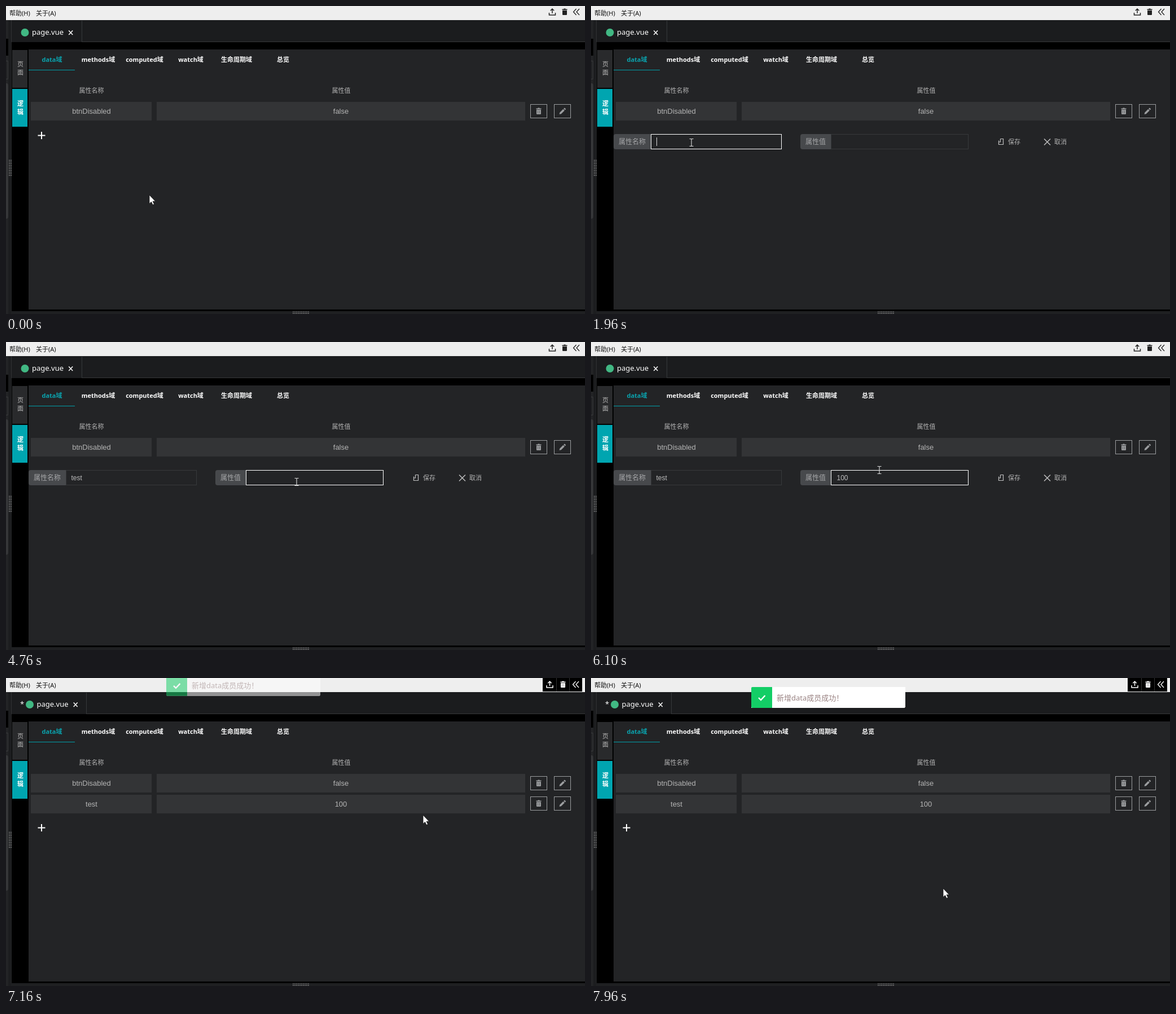
Animation of 1026 by 546 pixels, one loop 8000 ms. Source, as an HTML page:

```html
<!DOCTYPE html>
<html lang="zh-CN">
<head>
<meta charset="utf-8">
<title>page.vue</title>
<style>
html, body { margin: 0; width: 100%; height: 100%; overflow: hidden; background: #000; }
svg { display: block; }
text { font: 11px "Noto Sans", "Noto Sans CJK SC", "Noto Sans CJK", sans-serif; white-space: pre; }
rect { shape-rendering: crispEdges; }
.mid { text-anchor: middle; }
.tab { font-weight: 600; fill: #fff; text-anchor: middle; }
.cell { font: 13px "Liberation Sans", Arial, sans-serif; fill: #b4b4b4; text-anchor: middle; }
.typed { font: 12px "Liberation Sans", Arial, sans-serif; fill: #bcbcbc; }
.label { font-size: 12px; fill: #a6a7a9; }
.soft { fill: #b4b4b4; }
.title { font-size: 13px; fill: #fff; }
.line { fill: none; stroke: currentColor; }
.fill { fill: currentColor; }
</style>
</head>
<body>
<svg width="1026" height="546" viewBox="0 0 1026 546">
  <defs>
    <g id="trash">
      <path class="fill" d="M-4.5-5h3v-1h3v1h3v1.500h-9zM-4-2.700h8v7.200q0 1-1 1h-6q-1 0-1-1z"/>
      <path d="M-1.500-1.200v5M1.500-1.200v5" stroke="#232426" stroke-width=".8" opacity=".6"/>
    </g>
    <path id="pencil" class="fill" d="M-5.500 5.500l.8-3.300 6-6 2.500 2.500-6 6zM2.100-4.600l1-1q.7-.6 1.400 0l1.100 1.100q.6.700 0 1.400l-1 1z"/>
    <path id="upload" class="line" stroke-width="1.500" d="M-5.500 1.500v4h11v-4M0 2.500v-8M-3.200-2.300L0-5.500l3.200 3.200"/>
    <path id="chevrons" class="line" stroke-width="1.300" d="M0-5.500L-5 0l5 5.500M5.500-5.500l-5 5.500 5 5.500"/>
    <g id="actions" color="#9b9d9f">
      <rect class="line" x="929.5" y="174.5" width="29" height="24"/>
      <rect class="line" x="971.5" y="174.5" width="29" height="24"/>
      <use href="#trash" x="944" y="186.500"/>
      <use href="#pencil" x="986" y="186.500"/>
    </g>
    <g id="cells" fill="#333436">
      <rect x="44" y="170" width="214" height="33"/>
      <rect x="267" y="170" width="653" height="33"/>
    </g>
  </defs>

  <rect width="1026" height="546" fill="#000"/>
  <rect y="25" width="10" height="521" fill="#232426"/>
  <rect x="4" y="25" width="5" height="521" fill="#1c1d1f"/>
  <rect y="58" width="4" height="30" fill="#000"/>
  <path d="M0 97.500h3.500v32H0" fill="none" stroke="#38393b"/>
  <path d="M0 137h1q3 0 3 4v232q0 4-3 4H0z" fill="#353638"/>
  <rect x="9" y="25" width="1017" height="39" fill="#1b1c1e"/>
  <rect x="9" y="25" width="1" height="39" fill="#303234"/>
  <rect id="tabLine" y="63" height="1" fill="#36383a"/>
  <rect id="tabEdge" y="26" width="1" height="38" fill="#36383a"/>
  <rect x="40" y="77" width="986" height="461" fill="#232426"/>
  <rect x="9" y="541" width="1017" height="5" fill="#1f2022"/>
  <g id="dots" fill="#a0a0a0"></g>

  <rect width="1026" height="25" fill="#eee"/>
  <text x="6" y="17" fill="#111">帮助(H)</text>
  <text x="53" y="17" fill="#111">关于(A)</text>
  <g id="toolsIdle" color="#222">
    <use href="#upload" x="968" y="10.500"/>
    <use href="#trash" x="990" y="10.500"/>
    <use href="#chevrons" x="1010.500" y="10.500"/>
  </g>
  <g id="toolsDirty" color="#fff">
    <rect x="951" width="70" height="24" fill="#000"/>
    <path d="M975.500 0v24M998.500 0v24" stroke="#333"/>
    <use href="#upload" x="963.500" y="11.500"/>
    <use href="#trash" x="987" y="11.500"/>
    <use href="#chevrons" x="1009.500" y="11.500"/>
  </g>

  <text id="star" class="title" x="25" y="51">*</text>
  <g id="title">
    <circle cx="33.500" cy="47" r="7" fill="#41b883"/>
    <text class="title" x="46" y="51">page.vue</text>
    <path d="M111.200 43.500l7 7.500M118.200 43.500l-7 7.500" stroke="#fff" stroke-width="1.500"/>
  </g>

  <rect x="11" y="78" width="27" height="67" fill="#292a2c"/>
  <rect x="11" y="147" width="27" height="67" fill="#00a5b0"/>
  <g class="mid" fill="#b8b8b8"><text x="25.500" y="107">页</text><text x="25.500" y="122">面</text></g>
  <g class="mid" fill="#fff"><text x="25.500" y="177" font-weight="600" style="font-weight:600">逻</text><text x="25.500" y="192" style="font-weight:600">辑</text></g>

  <text class="tab" x="81.500" y="99" style="fill:#0aa3ae">data域</text>
  <text class="tab" x="163.500" y="99">methods域</text>
  <text class="tab" x="245.500" y="99">computed域</text>
  <text class="tab" x="327.500" y="99">watch域</text>
  <text class="tab" x="408.500" y="99">生命周期域</text>
  <text class="tab" x="491" y="99">总览</text>
  <rect x="40" y="113" width="82" height="1" fill="#00a0aa"/>

  <text class="soft mid" x="151.500" y="154">属性名称</text>
  <text class="soft mid" x="594" y="154">属性值</text>
  <use href="#cells"/>
  <use href="#actions"/>
  <text class="cell" x="151.500" y="191">btnDisabled</text>
  <text class="cell" x="593.500" y="191">false</text>

  <g id="newRow">
    <use href="#cells" y="37"/>
    <use href="#actions" y="36"/>
    <text class="cell" x="151.500" y="227.500">test</text>
    <text class="cell" x="593.500" y="227.500">100</text>
  </g>
  <path id="plus" d="M56.500 229.500h13M63 223v13" stroke="#fff" stroke-width="2"/>

  <g id="form">
    <path d="M44 227h62v27H44q-4 0-4-4v-19q0-4 4-4z" fill="#47494c"/>
    <text class="label" x="49" y="245">属性名称</text>
    <rect id="nameBox" x="106.500" y="227.500" width="231" height="26" fill="none"/>
    <text id="nameText" class="typed" x="115.500" y="245"></text>
    <path d="M375 227h50v27h-50q-4 0-4-4v-19q0-4 4-4z" fill="#47494c"/>
    <text class="label" x="380" y="245">属性值</text>
    <rect id="valueBox" x="425.500" y="227.500" width="243" height="26" fill="none"/>
    <text id="valueText" class="typed" x="435.500" y="245"></text>
    <rect id="caret" y="233" width="1" height="15" fill="#ddd"/>
    <path d="M725.500 235.500h5v10h-8v-7M725.500 235.500v5.500h-3" fill="none" stroke="#c0c0c0" stroke-width="1.200"/>
    <text class="soft" x="739" y="244.500">保存</text>
    <path d="M803 235.500l11 11M814 235.500l-11 11" stroke="#c0c0c0" stroke-width="1.500"/>
    <text class="soft" x="821" y="244.500">取消</text>
  </g>

  <g id="toast">
    <rect x="284" y="16" width="273" height="37" rx="2" fill="#fff"/>
    <path d="M286 16h35v37h-35q-2 0-2-2V18q0-2 2-2z" fill="#13ce66"/>
    <path d="M297 35l4 4 7.500-8" fill="none" stroke="#fff" stroke-width="2.400"/>
    <text x="329" y="39.500" style="font-size:13px" fill="#9a8383">新增data成员成功！</text>
  </g>

  <g id="cursor">
    <path id="arrow" d="M0 0v15.500l3.500-3.300 2.500 5.300 2.600-1.200-2.500-5.100h4.600z" fill="#fff" stroke="#111" stroke-width=".8"/>
    <path id="hand" d="M-2 1.500q0-1.500 1.700-1.500T1.400 1.500v5q1.400-.8 2.800.3 1.500-.6 2.600.6 2.700-.2 2.700 2.200v4.500q0 3-1.800 5V21h-8v-1.800L-6 12.600q-1-2 .5-2.700 1.300-.4 2.500 1l1 1.200z" fill="#fff" stroke="#111" stroke-width=".8"/>
    <path id="beam" d="M-3.500-6.500h2.500q1 0 1 1 0-1 1-1h2.500M0-5.500v11M-3.500 6.500h2.500q1 0 1-1 0 1 1 1h2.500" fill="none" stroke="#ddd" stroke-width="1.100"/>
  </g>
</svg>
<script>
const LOOP = 8000, OPEN = 1370, SAVE = 6970, TOAST = 7070, BLINK = 490;
const $ = id => document.getElementById(id);
const show = (id, on) => $(id).style.display = on ? "" : "none";
const set = (id, name, value) => $(id).setAttribute(name, value);

// time, x, y of the pointer's hot spot
const path = [
  [460, 254, 335], [580, 230, 318], [700, 200, 296], [900, 125, 254], [1050, 76, 219], [1190, 64, 224],
  [1340, 64, 224], [1500, 90, 217], [1650, 130, 230], [1800, 168, 240], [1960, 178, 242],
  [3310, 178, 242], [3490, 190, 252], [3560, 208, 265], [3700, 270, 282], [3800, 340, 284],
  [3900, 425, 277], [4000, 490, 261], [4080, 511, 249],
  [4260, 511, 249], [4350, 513, 253], [4460, 514.5, 248],
  [5780, 514.5, 248], [5850, 522, 239], [5920, 513, 231], [6050, 513, 231],
  [6100, 511, 227], [6250, 560, 231], [6450, 680, 240], [6600, 754, 240], [6720, 739, 243],
  [7180, 739, 243], [7350, 733, 275], [7500, 700, 320], [7690, 645, 353],
  [7750, 633, 364], [7810, 624, 372], [7960, 624, 373]
];

const fields = [
  { id: "name", focus: 1840, blur: 4260, x: 115.5, box: [106, 338],
    keys: [[2640, "te"], [2760, "tes"], [3100, "test"]] },
  { id: "value", focus: 4260, blur: SAVE, x: 435.5, box: [425, 669],
    keys: [[5100, "1"], [5250, "10"], [5430, "100"]] }
];

function pointer(t) {
  const i = path.findIndex(p => p[0] > t);
  if (i < 1) return path[i ? path.length - 1 : 0].slice(1);
  const [a, b] = [path[i - 1], path[i]];
  const k = (t - a[0]) / (b[0] - a[0]);
  return [a[1] + (b[1] - a[1]) * k, a[2] + (b[2] - a[2]) * k];
}

// the CSS "ease" curve, solved by bisection
function ease(x) {
  const bez = (u, a, b) => 3 * u * (1 - u) ** 2 * a + 3 * u * u * (1 - u) * b + u ** 3;
  let lo = 0, hi = 1;
  for (let i = 0; i < 20; i++) {
    const mid = (lo + hi) / 2;
    if (bez(mid, .25, .25) < x) lo = mid; else hi = mid;
  }
  return bez(lo, .1, 1);
}

function drawField(f, t, x, y) {
  const key = f.keys.filter(k => k[0] <= t).pop();
  const text = $(f.id + "Text");
  const active = t >= f.focus && t < f.blur;
  const hover = x >= f.box[0] && x <= f.box[1] && y >= 227 && y <= 254;
  text.textContent = key ? key[1] : "";
  set(f.id + "Box", "stroke", active || hover ? "#fff" : "#37393b");
  if (active) {
    const since = t - Math.max(f.focus, key ? key[0] : 0);
    show("caret", Math.floor(since / BLINK) % 2 === 0);
    set("caret", "x", Math.round(f.x + (key ? text.getComputedTextLength() : 0)));
  }
  return hover;
}

function draw(t) {
  const [x, y] = pointer(t);
  const editing = t >= OPEN && t < SAVE;
  const saved = t >= SAVE;

  show("form", editing);
  show("plus", !editing);
  set("plus", "transform", `translate(0 ${saved ? 36 : 0})`);
  show("newRow", saved);
  show("star", saved);
  show("toolsIdle", !saved);
  show("toolsDirty", saved);
  const shift = saved ? 8.5 : 0, edge = saved ? 142 : 134;
  set("title", "transform", `translate(${shift} 0)`);
  set("tabEdge", "x", edge);
  set("tabLine", "x", edge);
  set("tabLine", "width", 1026 - edge);

  let kind = "arrow";
  if (editing) {
    show("caret", false);
    if (fields.map(f => drawField(f, t, x, y)).some(Boolean)) kind = "beam";
    else if (x > 718 && x < 766 && y > 229 && y < 252) kind = "hand";
  } else if (!saved && x < 75 && y > 214 && y < 241) kind = "hand";
  for (const id of ["arrow", "hand", "beam"]) show(id, id === kind);
  set("cursor", "transform", `translate(${Math.round(x)} ${Math.round(y)})`);

  const p = ease(Math.min(1, Math.max(0, (t - TOAST) / 300)));
  show("toast", t >= TOAST);
  set("toast", "opacity", p);
  set("toast", "transform", `translate(0 ${-44 * (1 - p)})`);
}

function addDot(x, y) {
  const dot = document.createElementNS("http://www.w3.org/2000/svg", "rect");
  for (const [k, v] of Object.entries({ x, y, width: 2, height: 1 })) dot.setAttribute(k, v);
  $("dots").append(dot);
}
for (let i = 0; i < 10; i++) {
  for (const j of [0, 1]) {
    addDot(5 + j * 3, 273 + i * 3);
    addDot(508 + i * 3, 542 + j * 3);
  }
}

function tick() {
  draw(performance.now() % LOOP);
  requestAnimationFrame(tick);
}
tick();
</script>
</body>
</html>
```
